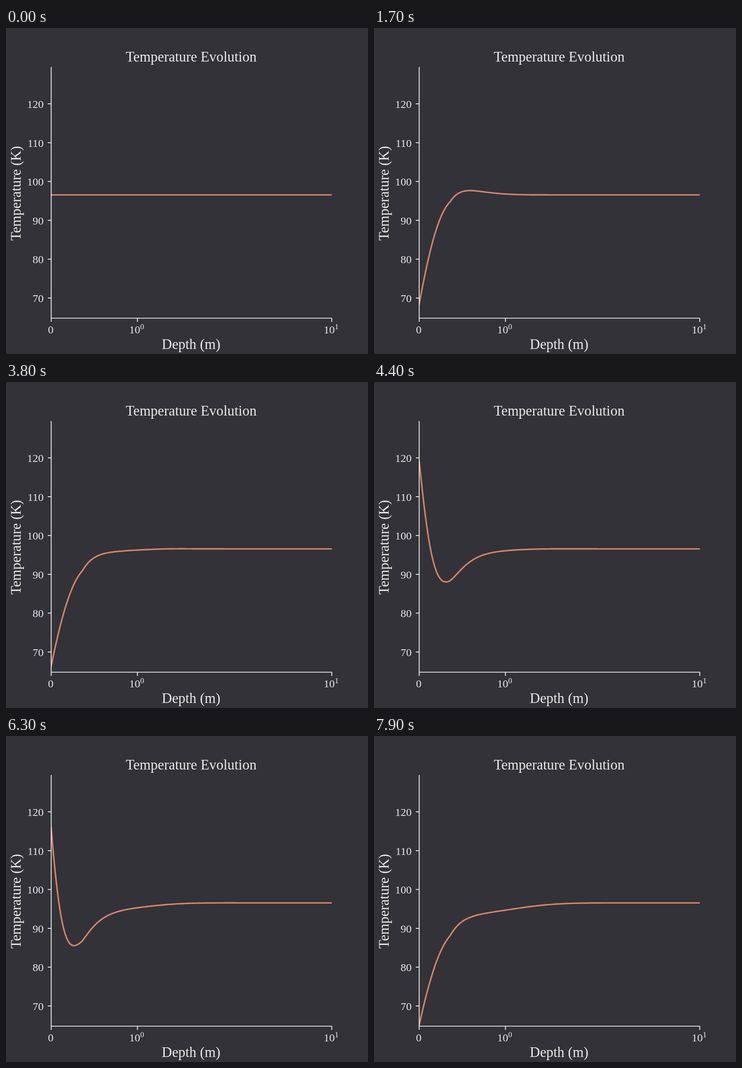
Recreate the animation shown at these times as an HTML page. Size 789 by 710 pixels, loop 8 s.

```html
<!DOCTYPE html>
<html lang="en">
<head>
<meta charset="utf-8">
<title>Temperature Evolution</title>
<style>
  html, body { margin: 0; width: 100%; height: 100%; overflow: hidden; background: #333238; }
  svg { display: block; }
  text { font-family: "Liberation Serif", "Times New Roman", serif; font-size: 24px; fill: #ececec; }
  .label { font-size: 30.9px; text-anchor: middle; }
  .sup { font-size: 17px; }
  .axis { fill: none; stroke: #fff; stroke-width: 1.7; }
  #curve { fill: none; stroke: #d4866b; stroke-width: 3.2; stroke-linejoin: round; stroke-linecap: square; }
</style>
</head>
<body>
<svg width="789" height="710" viewBox="0 0 789 710">
  <clipPath id="plot"><rect x="98.5" y="85" width="611.7" height="547"/></clipPath>
  <path id="curve" clip-path="url(#plot)"/>
  <path class="axis" d="M98.5 85V632H710.5M98.5 632v8M286.5 632v8M710 632v8"/>
  <g id="ticks"></g>
  <text x="97.5" y="665" text-anchor="middle">0</text>
  <text x="268.5" y="665">10</text><text class="sup" x="292.5" y="656">0</text>
  <text x="692.5" y="665">10</text><text class="sup" x="716.5" y="656">1</text>
  <text class="label" x="403.5" y="72.5">Temperature Evolution</text>
  <text class="label" x="403.5" y="699">Depth (m)</text>
  <text class="label" transform="translate(32 360) rotate(-90)">Temperature (K)</text>
</svg>
<script>
const FRAMES = 80, FRAME_MS = 100;
const DAY = 20, SUBSTEPS = 100, DT = 1 / (DAY * SUBSTEPS); // time in days
const CELLS = 200, DZ = 0.02;
const START = 96.55;     // initial temperature
const SUN = 2.78;        // noon sunlight, relative to emission at START
const SUNRISE_LEAD = 1;  // frames between sunrise and the first frame

// Axes: linear depth to 1 m, logarithmic beyond
const toX = z => z < 1 ? 98.5 + 188 * z : 286.5 + 423.5 * Math.log10(z);
const toY = temp => 588 - (temp - 70) * 8.456;

// Ground layers meet at 0.36 m and 2.87 m
const capacity = z => z < 0.36 ? 0.023 : 0.0162;
const diffusivity = z => z < 0.36 ? 0.09 : z < 2.87 ? 0.06 + 0.07 * z : 0.1;
const conductance = Array.from({ length: CELLS }, (_, i) => {
  const z = (i + 0.5) * DZ;
  return capacity(z) * diffusivity(z) / DZ;
});

// Sunlight in, thermal radiation out
function surfaceFlux(frame, temp) {
  const angle = 2 * Math.PI * (frame + SUNRISE_LEAD) / DAY;
  return SUN * Math.max(0, Math.sin(angle)) - (temp / START) ** 4;
}

function step(temp, frame) {
  let inflow = surfaceFlux(frame, temp[0]);
  for (let i = 0; i < CELLS; i++) {
    const outflow = conductance[i] * (temp[i] - temp[i + 1]);
    const thickness = i ? DZ : DZ / 2;
    temp[i] += DT * (inflow - outflow) / (capacity(i * DZ) * thickness);
    inflow = outflow;
  }
}

function toPath(temp) {
  const points = temp.map((t, i) => `${toX(i * DZ).toFixed(2)} ${toY(t).toFixed(2)}`);
  return `M${points.join('L')}L712 ${toY(START).toFixed(2)}`;
}

const temp = new Array(CELLS + 1).fill(START);
const paths = [];
for (let n = 0; n < FRAMES; n++) {
  paths.push(toPath(temp));
  for (let s = 0; s < SUBSTEPS; s++) step(temp, n + s / SUBSTEPS);
}

const ticks = document.getElementById('ticks');
for (let t = 70; t <= 120; t += 10) {
  const y = toY(t);
  ticks.innerHTML +=
    `<path class="axis" d="M91 ${y}h7.5"/><text x="82" y="${y + 9}" text-anchor="end">${t}</text>`;
}

const curve = document.getElementById('curve');
function draw() {
  curve.setAttribute('d', paths[Math.floor(performance.now() / FRAME_MS) % FRAMES]);
  requestAnimationFrame(draw);
}
draw();
</script>
</body>
</html>
```
